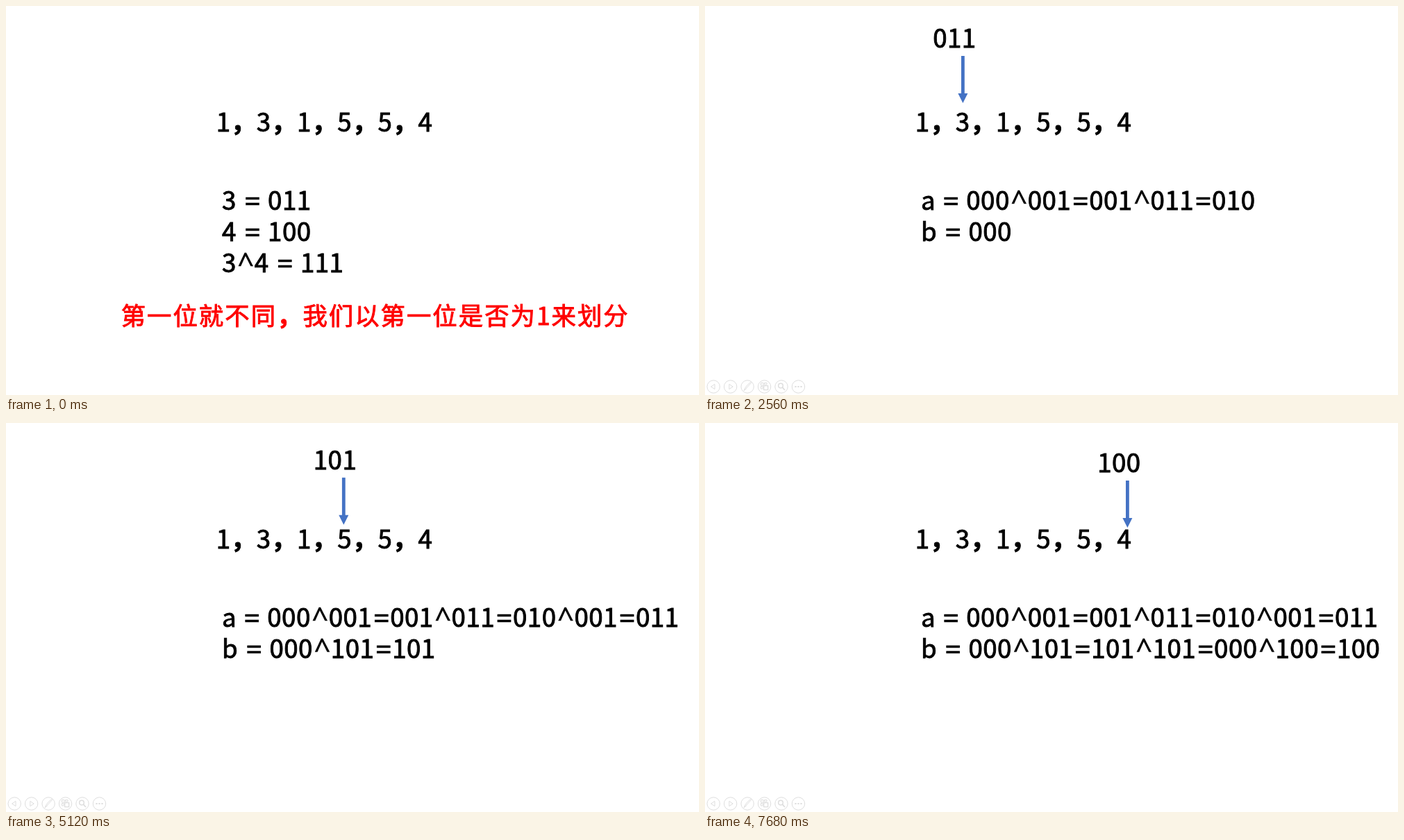
Write an HTML page that moves like this. It is 998x561 px and loops after 8 s.

```html
<!DOCTYPE html>
<html lang="zh-CN">
<head>
<meta charset="utf-8">
<title>XOR grouping</title>
<style>
html, body { margin: 0; width: 100%; height: 100%; overflow: hidden; background: #fff; }
svg { display: block; width: 100%; height: 100%; }
text {
  font: 400 36.7px "Noto Sans CJK SC", "Noto Sans CJK", "Noto Sans", sans-serif;
  letter-spacing: .45px;
  fill: #000; stroke: #000; stroke-width: .9;
}
.list { letter-spacing: .55px; }
.op {
  font: 400 42px "Noto Sans", sans-serif;
  letter-spacing: 0; text-anchor: middle; stroke-width: .4;
}
.note { font-size: 35.4px; letter-spacing: 2px; fill: #f00; stroke: #f00; }
.comma { font-weight: 700; }
.bar { fill: none; stroke: #dedede; stroke-width: 1; }
</style>
</head>
<body>
<svg viewBox="0 0 998 561">
  <text id="list" class="list" x="302.7" y="180.5"></text>
  <text id="note" class="note" x="165.7" y="460.2"></text>
  <g id="rows"></g>
  <g id="pointer">
    <text id="bits"></text>
    <path id="arrow" fill="#4472c4" d="M-2.4 0H2.4V54H7L0 68L-7 54H-2.4Z"/>
  </g>
  <g id="bar" class="bar">
    <g id="rings"></g>
    <path d="M14 545.4V552.6L8.6 549Z M34.8 545.4V552.6L40.2 549Z"/>
    <path d="M66.8 543.2L60 550.6L58.6 549.2L65.4 542.6Z M58.4 550L56 554.6L60 551.4"/>
    <path d="M80.5 543.5H84V547H80.5Z M85.5 543.5H89V546H85.5Z M80.5 548.5H83V552H80.5Z"/>
    <path d="M84.6 547.6H90.6V553.6H84.6Z" stroke-width="1.4"/>
    <circle cx="109" cy="547.6" r="3.3" stroke-width="1.5"/>
    <path d="M111.5 550.2L115 554" stroke-width="1.8"/>
    <path d="M129.4 549h2.2m1.8 0h2.2m1.8 0h2.2" stroke-width="2"/>
  </g>
</svg>
<script>
const NS = 'http://www.w3.org/2000/svg';
const $ = id => document.getElementById(id);
const STEP = 1280, LOOP = 8000;
const DIGIT = 20.81, OP = 26, SPACE = 9.7;
const LETTER = { a: 20, b: 23.1 };

const A = 'a = 000^001=001', B = 'b = 000';
const A2 = A + '^011=010', A3 = A2 + '^001=011';
const B2 = B + '^101=101', B3 = B2 + '^101=000';

// bits: label, bx: label x, ax: arrow x, dy: drop of the pointer
const scenes = [
  { rows: ['3 = 011', '4 = 100', '3^4 = 111'] },
  { rows: [A, B], bits: '001', bx: 269.9, ax: 310.5, dy: 0 },
  { rows: [A2, B], bits: '011', bx: 328.2, ax: 371.4, dy: 0 },
  { rows: [A3, B], bits: '001', bx: 386.9, ax: 429.6, dy: 6.7 },
  { rows: [A3, B2], bits: '101', bx: 442.8, ax: 486.3, dy: 6.7 },
  { rows: [A3, B3], bits: '101', bx: 506.6, ax: 549.7, dy: 6.7 },
  { rows: [A3, B3 + '^100=100'], bits: '100', bx: 565.2, ax: 608.4, dy: 11 }
];

function add(parent, tag, attrs, content = '') {
  const el = document.createElementNS(NS, tag);
  for (const k in attrs) el.setAttribute(k, attrs[k]);
  el.textContent = content;
  parent.appendChild(el);
}

// Commas are heavier than the text around them.
function write(id, str) {
  for (const part of str.split(/(，)/)) {
    add($(id), 'tspan', part === '，' ? { class: 'comma' } : {}, part);
  }
}

function drawRow(str, x, y) {
  for (const part of str.match(/[=^]| |[^=^ ]+/g)) {
    if (part === ' ') {
      x += SPACE;
    } else if (part === '=' || part === '^') {
      add($('rows'), 'text', { class: 'op', x: x + OP / 2 + .6, y: y + 2 }, part);
      x += OP;
    } else {
      add($('rows'), 'text', { x, y }, part);
      x += LETTER[part] || part.length * DIGIT;
    }
  }
}

function show(id, on) {
  $(id).setAttribute('visibility', on ? 'visible' : 'hidden');
}

function render(i) {
  const s = scenes[i];
  $('rows').textContent = '';
  s.rows.forEach((str, n) => drawRow(str, 310.9, 294.2 + 45 * n));
  show('note', i === 0);
  show('pointer', i > 0);
  show('bar', i > 0);
  if (!s.bits) return;
  $('bits').textContent = s.bits;
  $('bits').setAttribute('x', s.bx);
  $('bits').setAttribute('y', 60.4 + s.dy);
  $('arrow').setAttribute('transform', `translate(${s.ax} ${72 + s.dy})`);
}

write('list', '1，3，1，5，5，4');
write('note', '第一位就不同，我们以第一位是否为1来划分');
for (let i = 0; i < 6; i++) add($('rings'), 'circle', { cx: 12.2 + 24.45 * i, cy: 549, r: 9.2 });

let start = null, current = 0;
function tick(now) {
  if (start === null) start = now;
  const i = Math.floor(((now - start) % LOOP) / STEP);
  if (i !== current) render(current = i);
  requestAnimationFrame(tick);
}
render(0);
requestAnimationFrame(tick);
</script>
</body>
</html>
```
